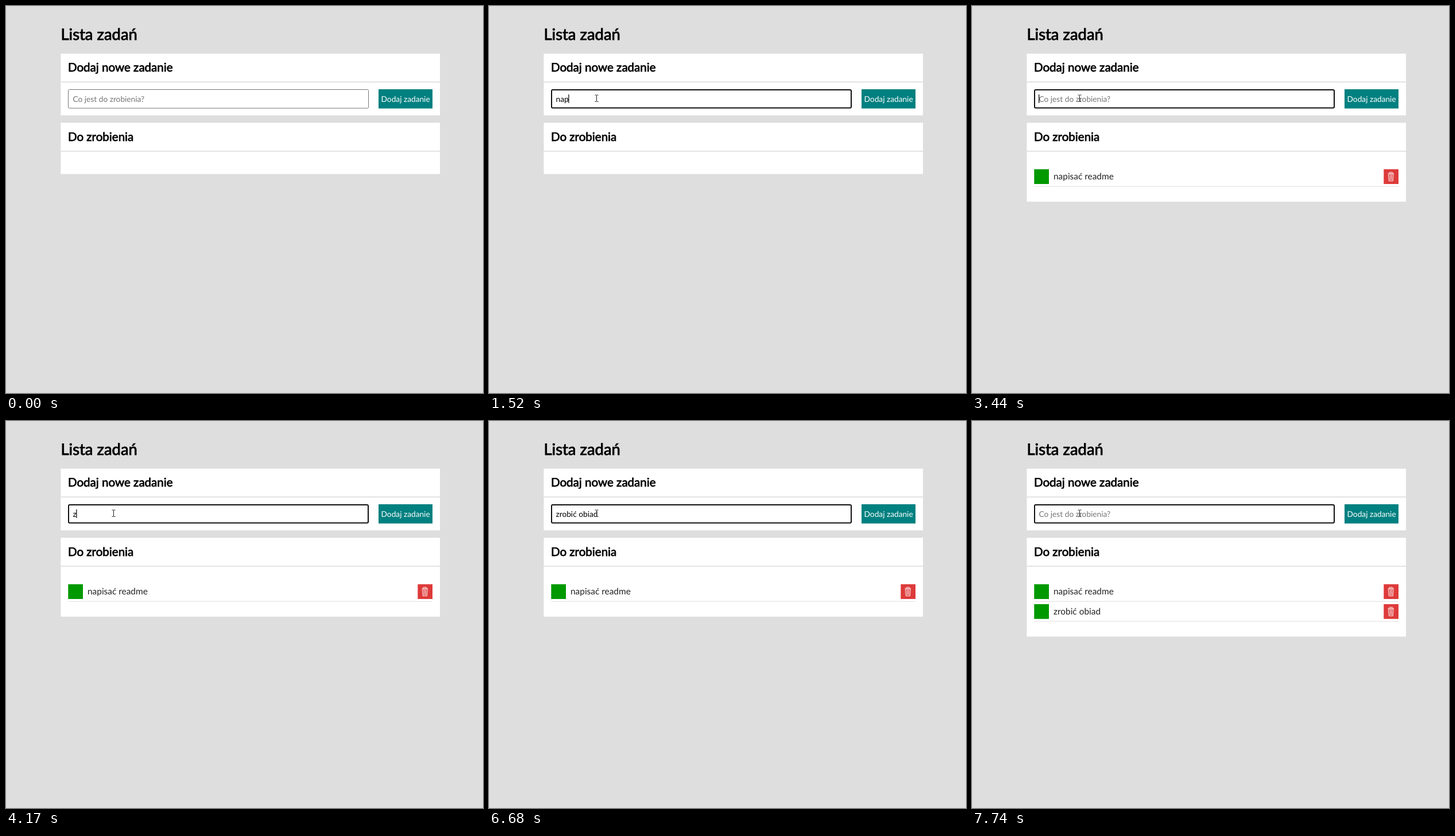
These frames come from a looping animation (831x674 px, 8 s). An HTML page:

```html
<!DOCTYPE html>
<html lang="pl">
<head>
<meta charset="utf-8">
<title>Lista zadań</title>
<style>
  html, body { margin: 0; width: 100%; height: 100%; overflow: hidden; background: #dedede; }
  svg { display: block; width: 831px; height: 674px; }
  text { font: 13.72px Lato, sans-serif; text-rendering: geometricPrecision; white-space: pre; }
  .title { font-size: 27.43px; stroke: #000; stroke-width: .9px; }
  .heading { font-size: 20.57px; stroke: #000; stroke-width: .75px; }
  .task { font-size: 15.43px; fill: #222; }
  .panel { fill: #fff; }
  .rule { fill: #dedede; }
</style>
</head>
<body>
<svg viewBox="0 0 831 674">
  <defs>
    <g id="trash" fill="none" stroke="#fff" stroke-width=".9">
      <path d="M10 6.6V5.3h5v1.3M7.2 7.3h10.6M8 8.8l1 11.6h7l1-11.6z"/>
      <path d="M10.6 10v9M12.5 10v9M14.4 10v9" stroke-width=".8"/>
    </g>
  </defs>

  <text class="title" x="95.5" y="58.7">Lista zadań</text>

  <rect class="panel" x="95.5" y="83" width="660.5" height="107.4"/>
  <text class="heading" x="107.9" y="114.3">Dodaj nowe zadanie</text>
  <rect class="rule" x="95.5" y="131.5" width="660.5" height="1.7"/>
  <rect id="field" fill="#fff"/>
  <text id="entry" x="116.5" y="166.8"></text>
  <rect id="caret" y="154" width="1.2" height="15"/>
  <rect x="649" y="145" width="94" height="33.5" fill="#008080"/>
  <text x="696.1" y="166.8" fill="#fff" text-anchor="middle">Dodaj zadanie</text>

  <rect id="list" class="panel" x="95.5" y="203.4" width="660.5"/>
  <text class="heading" x="107.9" y="235.1">Do zrobienia</text>
  <rect class="rule" x="95.5" y="252" width="660.5" height="1.7"/>
  <g id="tasks"></g>

  <path id="arrow" d="M.5.5v16l3.7-3.6 2.4 5.6 2.3-1-2.4-5.4h5z" fill="#fff" stroke="#000"/>
  <path id="beam" d="M-3-5.5h2.2L0-5l.8-.5H3M0-5V5.5M-3 6h2.2L0 5.5l.8.5H3" fill="none" stroke="#222"/>
</svg>
<script>
const LOOP = 8000, FOCUS = 610;
const $ = id => document.getElementById(id);
const set = (el, attrs) => { for (const k in attrs) el.setAttribute(k, attrs[k]); };
const show = (el, on) => { el.style.display = on ? '' : 'none'; };

// Key press times, one per character; Enter moves the text into the list.
const entries = [
  { text: 'napisać readme', enter: 3440,
    keys: [1200, 1320, 1520, 1720, 1820, 1920, 2120, 2250, 2380, 2510, 2710, 2910, 3050, 3110] },
  { text: 'zrobić obiad ', enter: 6880,
    keys: [4170, 4370, 4480, 4590, 4700, 4970, 5100, 5280, 5390, 5500, 5610, 5810, 6140] }
];
const strokes = [FOCUS, ...entries.flatMap(e => e.keys)];

const rows = entries.map((entry, i) => {
  const row = document.createElementNS('http://www.w3.org/2000/svg', 'g');
  row.setAttribute('transform', `translate(0 ${i * 34.7})`);
  row.innerHTML = `
    <rect x="108.3" y="284.3" width="25.7" height="25.7" fill="#009900"/>
    <text class="task" x="142" y="302.3">${entry.text.trim()}</text>
    <rect x="717.3" y="284.3" width="25.7" height="25.7" fill="#de3a3a"/>
    <use href="#trash" x="717.3" y="284.3"/>
    <rect x="108.3" y="313.7" width="634.7" height="1" fill="#dedede"/>`;
  $('tasks').append(row);
  return row;
});

function drawField(t) {
  const focused = t >= FOCUS, w = focused ? 2 : 1;
  set($('field'), {
    x: 108 + w / 2, y: 145 + w / 2, width: 524 - w, height: 33.5 - w, rx: 2,
    stroke: focused ? '#101010' : '#767676', 'stroke-width': w
  });

  const current = entries.find(e => t < e.enter);
  const typed = current ? current.text.slice(0, current.keys.filter(k => t >= k).length) : '';
  const entry = $('entry');
  entry.textContent = typed || 'Co jest do zrobienia?';
  entry.setAttribute('fill', typed ? '#000' : '#757575');

  const lastStroke = strokes.filter(k => t >= k).pop();
  const lit = focused && Math.floor((t - lastStroke) / 530) % 2 === 0;
  const width = typed ? entry.getComputedTextLength() : 0;
  $('caret').setAttribute('x', 116.5 + width - .4);
  show($('caret'), lit);
}

function drawList(t) {
  const count = entries.filter(e => t >= e.enter).length;
  rows.forEach((row, i) => show(row, i < count));
  $('list').setAttribute('height', [89.2, 137.4, 172.1][count]);
}

function drawPointer(t) {
  const step = Math.min(5, Math.floor((t - 70) / 80));
  show($('arrow'), t >= 70 && t < FOCUS);
  set($('arrow'), { transform: `translate(${734 - 8 * step / 5} ${648 - 431 * step / 5})` });
  show($('beam'), t >= FOCUS);
  set($('beam'), { transform: t < 670 ? 'translate(250.5 164.5)' : 'translate(187.5 160.5)' });
}

function frame(now) {
  const t = now % LOOP;
  drawField(t);
  drawList(t);
  drawPointer(t);
  requestAnimationFrame(frame);
}
frame(0);
</script>
</body>
</html>
```
